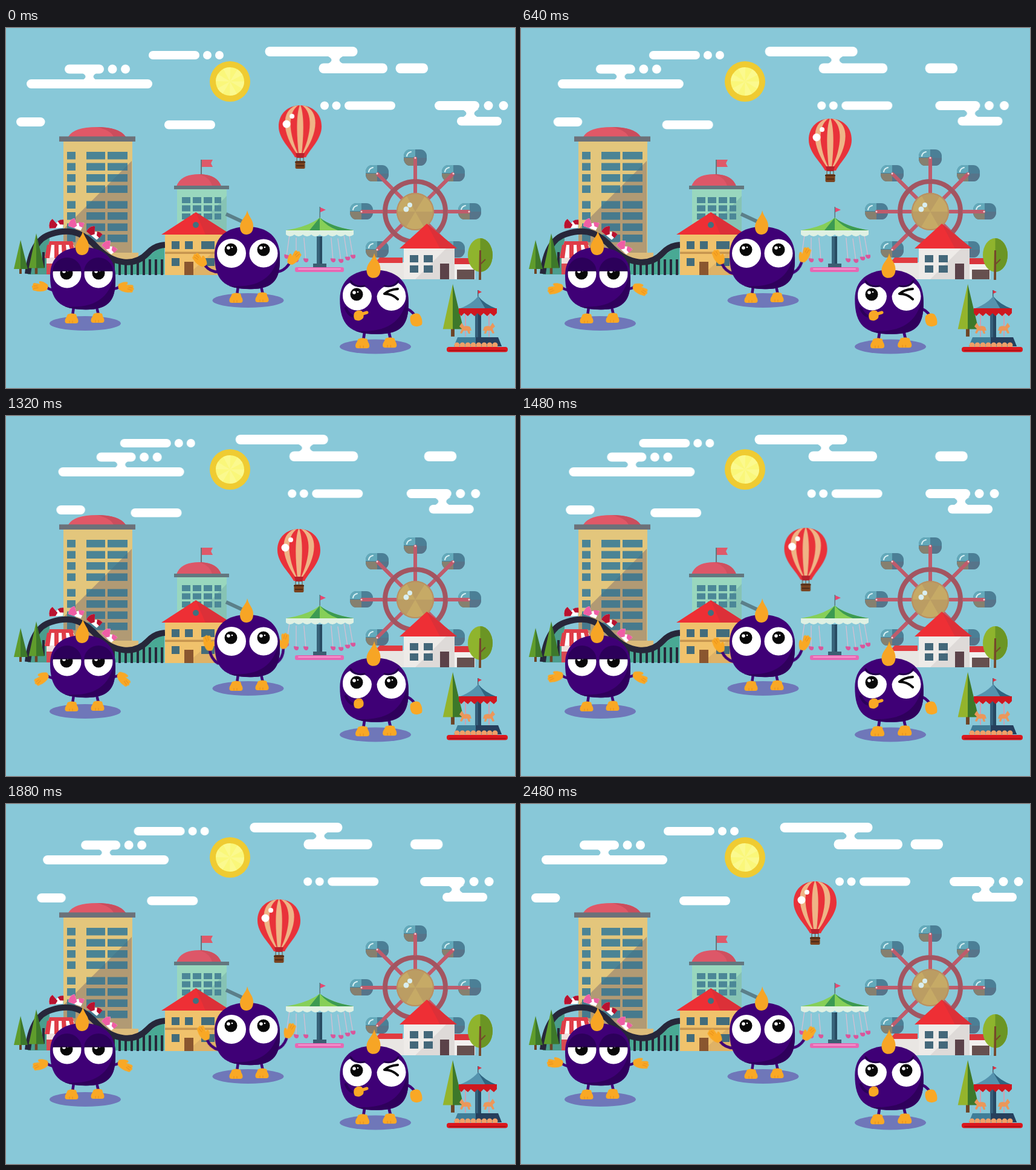
Recreate the animation shown at these times as an HTML page without scripts. Size 842x596 px, loop 2520 ms.

```html
<!DOCTYPE html>
<html lang="en">
<head>
<meta charset="utf-8">
<title>Fairground</title>
<style>
html, body { margin: 0; width: 100%; height: 100%; overflow: hidden; background: #88c8d8; }
svg { display: block; width: 100vw; height: 100vh; }

.cloud { fill: #fff; animation: drift 2.52s linear infinite; }
.early { animation-name: drift-early; }
@keyframes drift { 51.2% { transform: translateX(var(--d)); } 0%, 98.4%, 100% { transform: none; } }
@keyframes drift-early { 49.2% { transform: translateX(var(--d)); } 0%, 98.4%, 100% { transform: none; } }

.balloon { animation: float 2.52s linear infinite; }
@keyframes float {
  0%, 98.4%, 100% { transform: none; }
  6.3% { transform: translate(11px, 1px); }
  12.7% { transform: translate(20px, 5px); }
  19% { transform: translate(25px, 12px); }
  25.4% { transform: translate(25px, 22px); }
  38.1% { transform: translate(14px, 42px); }
  46% { transform: translate(7px, 53px); }
  52.4% { transform: translate(-2px, 59px); }
  59.5% { transform: translate(-17px, 57px); }
  66.7% { transform: translate(-29px, 47px); }
  74.6% { transform: translate(-35px, 30px); }
  82.5% { transform: translate(-30px, 14px); }
  90.5% { transform: translate(-17px, 3px); }
}

.wave, .wrist { animation: wave .42s cubic-bezier(.37, 0, .63, 1) infinite alternate; }
.wrist { animation-name: flick; }
@keyframes wave { to { transform: translate(1px, 4px) rotate(34deg); } }
@keyframes flick { to { transform: rotate(-40deg); } }

.wink { animation: wink 2.52s step-end infinite; }
.open { animation: open 2.52s step-end infinite; }
.fist { animation: fist 2.52s step-end infinite; }
@keyframes wink { 0%, 57.1% { opacity: 1; } 44.4%, 84.1% { opacity: 0; } }
@keyframes open { 0%, 57.1% { opacity: 0; } 44.4%, 81.7% { opacity: 1; } }
@keyframes fist { 0%, 57.1% { opacity: 0; } 44.4%, 84.1% { opacity: 1; } }

.limb { fill: none; stroke: #3f0076; stroke-width: 4.5; stroke-linecap: round; }
.line { fill: none; stroke-linecap: round; }
</style>
</head>
<body>
<svg viewBox="0 0 842 596" preserveAspectRatio="none">
<defs>
  <g id="pine">
    <path d="M-2 46h4v10h-4z" fill="#6d4526"/>
    <path d="M0 0L-11 48H0z" fill="currentColor"/>
    <path d="M0 0L12 48H0z" fill="#3d782a"/>
  </g>
  <g id="gondola">
    <rect x="-19" y="-14" width="38" height="27" rx="11" fill="#4b7f96"/>
    <path d="M0-14H-8Q-19-14-19-1H0z" fill="#63a9ba"/>
    <path d="M-19 0H19Q18 13 8 13H-8Q-18 13-19 0z" fill="#56748a"/>
    <path d="M-19 0H0V13H-8Q-18 13-19 0z" fill="#86806f"/>
    <path d="M-14-3Q-13-9-7-10" class="line" stroke="#d8f0f4" stroke-width="2"/>
  </g>
  <path id="spoke" d="M0-10V-88" stroke="#bf5b6b" stroke-width="6"/>
  <g id="hand" fill="#f9a825">
    <path d="M2-3Q-5-9-11-9Q-14-7-10-4L-20-6Q-24-5-22-2Q-26-1-23 3Q-24 7-19 7Q-9 10 0 6Q4 1 2-3z"/>
    <path d="M-21-1l6 0M-21 3l7-1" class="line" stroke="#e58c1c" stroke-width="1"/>
  </g>
  <g id="foot">
    <path d="M-8 8Q-13 8-11 1Q-9-2-7-7Q0-10 7-7Q8-2 10 1Q12 8 7 8z" fill="#f9a825"/>
    <path d="M-4 7V4M1 7V4" class="line" stroke="#e58c1c"/>
  </g>
  <g id="body">
    <path d="M-15 48L-17 62M23 48L26 61" class="limb"/>
    <use href="#foot" x="-18" y="67"/>
    <use href="#foot" x="25" y="66"/>
    <path d="M-54-4C-54-34-34-51 0-51C34-51 53-34 54-4C55 30 49 50 12 52C-36 54-54 40-54-4z" fill="#3f0076"/>
    <path d="M53-14C57 28 50 50 12 52Q-14 53-30 47C20 51 48 33 53-14z" fill="#2f005c"/>
    <path d="M0-78C-1-68-12-62-12-50Q-11-38-1-38Q10-39 10-52C10-63 3-66 0-78z" fill="#f7a525"/>
  </g>
  <g id="pupil">
    <circle r="10.5" fill="#080808"/>
    <circle cx="-4" cy="-3" r="2.800" fill="#fff"/>
    <circle cx="2" cy="-4" r="1.300" fill="#fff"/>
  </g>
  <ellipse id="shade" rx="59" ry="12" fill="#6f77b9"/>
  <g id="seat">
    <path d="M0-37V0" stroke="#d9bfd2" stroke-width="1.200"/>
    <path d="M-4-3Q-4 4 1 4Q5 3 4-2z" fill="#d9569b"/>
  </g>
  <g id="horse">
    <path d="M0-25V14" stroke="#e794a5" stroke-width="1.5"/>
    <path d="M-10-3L-6-9L-2-3Q4-5 8-2L10 4L7 4L8 9H5L3 4H-3L-6 9L-9 8L-6 1z" fill="#eb975a"/>
  </g>
  <g id="car">
    <path d="M-13 6Q-14-5-6-9L-1-1Q5-6 12-5L9 8z" fill="#fff"/>
    <path d="M-13 6Q-14-5-6-9L1 2L-3 7z"/>
    <path d="M2-4Q7-6 12-5L11 3L5 2z"/>
  </g>
  <path id="neck" d="M-14-1H14Q-1 6 14 13H-14Q1 6-14-1z"/>
  <path id="windows" d="M0 0V68" stroke-dasharray="12.500 6"/>
  <clipPath id="lids"><path d="M70 402H190V440H70z"/></clipPath>
  <clipPath id="envelope"><path id="bag" d="M451 163C451 142 466 128 486.500 128S522 142 522 163C522 184 503 200 496 214H478C471 200 451 184 451 163z"/></clipPath>
</defs>

<!-- sun -->
<circle cx="370.500" cy="88.500" r="33.500" fill="#efcb32"/>
<circle cx="370.500" cy="88.500" r="23.500" fill="#faf77a"/>
<circle cx="370.500" cy="88.500" r="11.750" fill="none" stroke="#fbf98e" stroke-width="23.500" stroke-dasharray="6.150"/>

<!-- ferris wheel -->
<g transform="translate(677 304)">
  <use href="#spoke"/><use href="#spoke" transform="rotate(45)"/><use href="#spoke" transform="rotate(90)"/>
  <use href="#spoke" transform="rotate(135)"/><use href="#spoke" transform="rotate(225)"/>
  <use href="#spoke" transform="rotate(270)"/><use href="#spoke" transform="rotate(315)"/>
  <circle r="50" fill="none" stroke="#a35561" stroke-width="8"/>
  <use href="#gondola" y="-89"/><use href="#gondola" x="63" y="-63"/><use href="#gondola" x="90"/>
  <use href="#gondola" x="63" y="63"/><use href="#gondola" x="-63" y="63"/>
  <use href="#gondola" x="-89"/><use href="#gondola" x="-63" y="-63"/>
  <g class="line" stroke="#bf5b6b" stroke-width="6">
    <path d="M0-56V-88M40-40L62-62M-40-40L-62-62M56 0H88M-56 0H-88M-40 40L-62 62"/>
    <path d="M0-89h0M63-63h0M-63-63h0M89 0h0M-89 0h0M-63 63h0" stroke="#f3d9dd" stroke-width="3"/>
  </g>
  <circle r="31" fill="#c6aa66"/>
  <circle r="15.500" fill="none" stroke="#bb9d63" stroke-width="31" stroke-dasharray="16.230"/>
  <circle r="30" fill="none" stroke="#b98f62" stroke-width="2"/>
  <circle cx="-9" cy="-11" r="4" fill="#d9eef0"/><circle cx="-15" cy="-4" r="4.500" fill="#d9eef0"/>
</g>

<!-- tower -->
<path d="M103 180Q112 164 150 164T198 180z" fill="#e05867"/>
<path d="M150 164Q187 164 198 180H178Q173 169 150 164z" fill="#cb4d5d"/>
<path d="M95 187H209V372H95z" fill="#e3c67c"/>
<path d="M208 220V372H95V333z" fill="#c8a978"/>
<path d="M88 179.500H214V188H88z" fill="#6c7179"/>
<path d="M90 372H219V407H90z" fill="#dcbc7b"/>
<g id="floors" fill="none" stroke="#4b8495">
  <use href="#windows" x="108" y="205" stroke-width="14"/>
  <use href="#windows" x="148.500" y="205" stroke-width="31"/>
  <use href="#windows" x="184.500" y="205" stroke-width="33"/>
</g>
<use href="#floors" y="81.500"/>
<path d="M208 220V372H95V333z" fill="#2f4260" opacity=".15"/>

<!-- domed building -->
<path d="M322 218h2v26h-2z" fill="#69747b"/>
<path d="M324 218h18l-3 6 3 6h-18z" fill="#df5969"/>
<path d="M282 262Q289 242 319 242T356 262z" fill="#dd5768"/>
<path d="M319 242Q349 242 356 262H341Q338 247 319 242z" fill="#cf505f"/>
<path d="M283 266H365V346H283z" fill="#99d7be"/>
<path d="M365 278V346H300z" fill="#86c3b4"/>
<path d="M278 261H369V267H278z" fill="#63777f"/>
<path d="M291 285H356M291 298.500H356M291 312H356" stroke="#4b8797" stroke-width="10" stroke-dasharray="14 4"/>
<path d="M364 308L392 321" stroke="#5b7f89" stroke-width="6"/>

<!-- coaster -->
<path d="M174 384Q205 402 230 382T262 360V408H174z" fill="#49a994"/>
<path d="M40 372Q50 346 72 342V408H36z" fill="#4b9d8d"/>
<path d="M176 396H262M40 384H70" stroke="#27273a" stroke-width="26" stroke-dasharray="4 6"/>
<path d="M36 407Q42 350 75 341C112 329 133 344 152 365C178 391 212 396 234 373Q246 360 263 359" fill="none" stroke="#27273a" stroke-width="10"/>
<use href="#car" transform="translate(84 324) rotate(-8)" fill="#b9122f"/>
<use href="#car" transform="translate(117 325) rotate(14)" fill="#ef5ea5"/>
<use href="#car" transform="translate(147 339) rotate(34)" fill="#b9122f"/>
<use href="#car" transform="translate(172 363) rotate(38)" fill="#ef5ea5"/>

<!-- booth and pines -->
<g color="#5f9c2c">
  <use href="#pine" x="24" y="351"/>
  <use href="#pine" transform="translate(50 340) scale(1.120 1.200)"/>
</g>
<path d="M67 377H114V408H67z" fill="#f0dfdc"/>
<path d="M67 390H114V408H67z" fill="#d94a52"/>
<path d="M72 353H110L118 380H64z" fill="#fff"/>
<path d="M72 353h38l2 6H70zM68 359h7l-3 22h-8zM80 359h7v22h-7zM92 359h7l2 22h-8zM104 359h7l7 22h-8z" fill="#df3d48"/>

<!-- yellow house -->
<path d="M263 342H366V409H263z" fill="#f0c26c"/>
<path d="M366 350V409H300z" fill="#dfb266"/>
<path d="M263 370.500H366V374H263z" fill="#c6954f"/>
<path d="M314 305L257 342H372z" fill="#ee2f35"/>
<path d="M314 305L372 342H330z" fill="#dc3038"/>
<circle cx="314" cy="326" r="5" fill="#40717f"/>
<path d="M274 353h13v13h-13zM296 353h13v13h-13zM323 353h22v13h-22zM274 381h13v13h-13zM323 381h22v13h-22z" fill="#436c7b"/>
<path d="M295 387h15v22h-15z" fill="#8a562f"/>

<!-- swing ride -->
<path d="M518.500 296h1.500v18h-1.500z" fill="#5b7580"/>
<path d="M520 297l9 4-9 4z" fill="#e8476f"/>
<path d="M514 345H523V396H514z" fill="#38637a"/>
<path d="M519 345h4v51h-4z" fill="#284b62"/>
<use href="#seat" transform="translate(464 378) rotate(8)"/><use href="#seat" x="480" y="384"/>
<use href="#seat" transform="translate(496 384) rotate(-5)"/><use href="#seat" transform="translate(541 384) rotate(-5)"/>
<use href="#seat" transform="translate(554 385) rotate(-8)"/><use href="#seat" transform="translate(565 381) rotate(-9)"/>
<use href="#seat" transform="translate(574 378) rotate(-10)"/>
<path d="M463 335H575V342q-7 6-14 0-7 6-14 0-7 6-14 0-7 6-14 0-7 6-14 0-7 6-14 0-7 6-14 0-7 6-14 0z" fill="#dff1e3"/>
<path d="M519 314Q500 329 463 335H575Q538 329 519 314z" fill="#86cf58"/>
<path d="M519 314Q538 329 575 335H549Q531 329 519 314zM519 314L502 335H519z" fill="#3c9a52"/>
<path d="M508 390h22v7h-22z" fill="#3b5e72"/>
<rect x="478" y="396" width="81" height="8" rx="3" fill="#e768b3"/>
<path d="M484 399H553" class="line" stroke="#f59ad0" stroke-width="2"/>

<!-- white house and tree -->
<path d="M612 388H660V416H612z" fill="#e9e6e3"/>
<path d="M618 380H656V389H610z" fill="#e13b40"/>
<path d="M740 390H776V416H740z" fill="#f2f0ee"/>
<path d="M738 381H775L781 391H738z" fill="#d9353c"/>
<path d="M746 400H775V416H746z" fill="#66504f"/>
<path d="M658 363H742V416H658z" fill="#eeebe8"/>
<path d="M742 364V416H677L729 364z" fill="#dedad8"/>
<path d="M696 324L651 365H746z" fill="#ee2f35"/>
<path d="M696 324L746 365H718z" fill="#dc3038"/>
<path d="M668 376h14v12h-14zM691 376h15v12h-15zM668 393h14v12h-14zM691 393h15v12h-15z" fill="#44687a"/>
<path d="M718 390h15v26h-15z" fill="#5b4249"/>
<ellipse cx="784.500" cy="376" rx="20.500" ry="28" fill="#8fb42d"/>
<path d="M784.500 348a20.500 28 0 0 1 0 56z" fill="#6b9524"/>
<path d="M783 368h3v49h-4z" fill="#75482b"/>
<path d="M784 392l9-9" stroke="#75482b" stroke-width="2"/>
<use href="#pine" transform="translate(739 424) scale(1.480 1.550)" color="#94b42c"/>

<!-- carousel -->
<path d="M780 434h1.500v12h-1.500z" fill="#4c6072"/><path d="M781 434l6 3-6 3z" fill="#df3142"/>
<path d="M776 470H786V514H776z" fill="#355f7b"/><path d="M781 470h5v44h-5z" fill="#264761"/>
<use href="#horse" x="760" y="497"/><use href="#horse" transform="translate(799 497) scale(-1 1)"/>
<path d="M781 444Q771 457 749 465H812Q791 457 781 444z" fill="#5593ae"/>
<path d="M781 444Q791 457 812 465H793z" fill="#306581"/>
<path d="M749 464H812V472l-5 5-6-5-5 5-6-5-5 5-5-5-5 5-6-5-5 5-6-5-5 5-4-5z" fill="#cf171f"/>
<path d="M747 512H814L820 527H741z" fill="#3f7d98"/><path d="M777 512h37l6 15h-43z" fill="#263f5d"/>
<path d="M746 525H818" class="line" stroke="#efa069" stroke-width="9" stroke-dasharray="0 9"/>
<rect x="729" y="528" width="101" height="8.500" rx="4" fill="#dc171d"/>
<path d="M734 534H826" class="line" stroke="#b31118" stroke-width="2"/>

<!-- clouds -->
<g class="cloud" style="--d:54px">
  <rect x="34" y="85" width="208" height="15" rx="7.500"/><rect x="97" y="60.500" width="65" height="15" rx="7.500"/>
  <use href="#neck" x="138" y="74.500"/>
  <circle cx="176" cy="68" r="7.500"/><circle cx="197.500" cy="68" r="7.500"/>
</g>
<rect class="cloud early" style="--d:71px" x="17" y="148" width="47.500" height="15" rx="7.500"/>
<g class="cloud" style="--d:-48.500px">
  <rect x="236" y="38" width="84" height="14" rx="7"/><circle cx="333" cy="45" r="7"/><circle cx="353" cy="45" r="7"/>
</g>
<g class="cloud" style="--d:-50px">
  <rect x="428.500" y="31" width="153" height="16" rx="8"/><rect x="517.500" y="58.500" width="113.500" height="16.500" rx="8"/>
  <use href="#neck" x="545" y="47"/>
</g>
<rect class="cloud" style="--d:48.500px" x="644.500" y="58.500" width="53.500" height="16.500" rx="8"/>
<g class="cloud early" style="--d:-57.500px">
  <circle cx="527" cy="128.500" r="7"/><circle cx="546.500" cy="128.500" r="7"/><rect x="560" y="121.500" width="84" height="14" rx="7"/>
</g>
<g class="cloud" style="--d:-47.500px">
  <rect x="709" y="121" width="74" height="15" rx="7.500"/><rect x="746" y="147" width="74" height="14.500" rx="7"/>
  <use href="#neck" x="768" y="135.500"/>
  <circle cx="798" cy="128.500" r="7.500"/><circle cx="823" cy="128.500" r="7.500"/>
</g>
<rect class="cloud" style="--d:-57px" x="262" y="153" width="84" height="14.500" rx="7"/>

<!-- balloon -->
<g class="balloon">
  <use href="#bag" fill="#e9323a"/>
  <g clip-path="url(#envelope)">
    <path d="M486.500 126C448 134 460 180 481 208H492C513 180 525 134 486.500 126z" fill="#efb486"/>
    <path d="M486.500 126C460 140 472 185 483 208H490C501 185 513 140 486.500 126z" fill="#e9323a"/>
    <path d="M486.500 126C479 145 481 180 484 208H489C492 180 494 145 486.500 126z" fill="#efb486"/>
  </g>
  <path d="M479 207H494L492 215H481z" fill="#b8222d"/>
  <path d="M481 214V222M486.500 214V222M492 214V222" stroke="#684028"/>
  <rect x="478.500" y="220" width="16" height="13" rx="2" fill="#7a431f"/>
  <path d="M478 222H495M480 228H493" stroke="#4d2a17" stroke-width="2"/>
  <circle cx="464" cy="159" r="6.500" fill="#fff"/><circle cx="473" cy="146" r="4" fill="#fff"/>
</g>

<!-- sleepy friend -->
<use href="#shade" x="131" y="489"/>
<path d="M80 434Q72 434 66 428M176 432Q184 432 189 427" class="limb"/>
<g transform="translate(67 428)"><g class="wrist"><use href="#hand"/></g></g>
<g transform="translate(188 427) scale(-1 1) rotate(-12)"><g class="wrist"><use href="#hand"/></g></g>
<use href="#body" x="127" y="414"/>
<g fill="#2c005a"><circle cx="101" cy="404" r="24"/><circle cx="153" cy="404" r="24"/></g>
<g clip-path="url(#lids)">
  <g fill="#fff"><circle cx="101" cy="407" r="23.500"/><circle cx="153" cy="407" r="23.500"/></g>
  <use href="#pupil" x="100" y="406"/><use href="#pupil" x="153" y="406"/>
</g>
<path d="M78 402H124M130 402H176" stroke="#1c003c" stroke-width="1.500"/>

<!-- cheerful friend -->
<use href="#shade" x="400.500" y="451"/>
<g transform="translate(348 401)"><g class="wave">
  <path d="M4 3Q-10 3-19-8" class="limb"/><use href="#hand" transform="translate(-19 -10) rotate(42)"/>
</g></g>
<g transform="translate(449 401) scale(-1 1)"><g class="wave">
  <path d="M4 3Q-10 3-19-10" class="limb"/><use href="#hand" transform="translate(-20 -13) rotate(48)"/>
</g></g>
<use href="#body" x="399" y="380"/>
<g fill="#fff"><circle cx="373" cy="373" r="24"/><circle cx="426" cy="373" r="23.500"/></g>
<use href="#pupil" x="372" y="367"/><use href="#pupil" x="426" y="367"/>

<!-- cheeky friend -->
<use href="#shade" x="611" y="527.500"/>
<path d="M660 464Q670 466 677 477" class="limb"/>
<path d="M669 477Q676 470 684 474Q690 482 688 491Q681 497 672 492Q667 486 669 477z" fill="#f9a825"/>
<use href="#body" transform="translate(609 453) scale(1.050 1.030)"/>
<g fill="#fff">
  <path d="M557 443C557 432 562 425 569 422Q577 431 593 428Q605 434 605 444A24 24 0 0 1 557 443z"/>
  <path d="M613.500 444Q615 434 626 428Q641 431 649 422Q661 430 661.500 444A24 24 0 0 1 613.500 444z"/>
</g>
<path d="M570 419Q577 430 593 427M649 419Q642 430 626 427" class="line" stroke="#23004a" stroke-width="3"/>
<use href="#pupil" x="580" y="441"/>
<g class="open"><use href="#pupil" x="637" y="441"/></g>
<path class="wink line" d="M648 432Q634 433 626 440Q639 440 648 449" stroke="#080808" stroke-width="4" stroke-linejoin="round"/>
<path d="M562 464Q567 477 578 478" class="line" stroke="#2c005a" stroke-width="4.500"/>
<path d="M576 472Q580 466 588 468Q593 473 591 480Q585 487 577 483Q574 478 576 472z" fill="#f9a825"/>
<path class="wink line" d="M587 474L597 471" stroke="#f9a825" stroke-width="5"/>
<path class="fist line" d="M580 471Q585 468 589 471" stroke="#e58c1c"/>
</svg>
</body>
</html>
```
